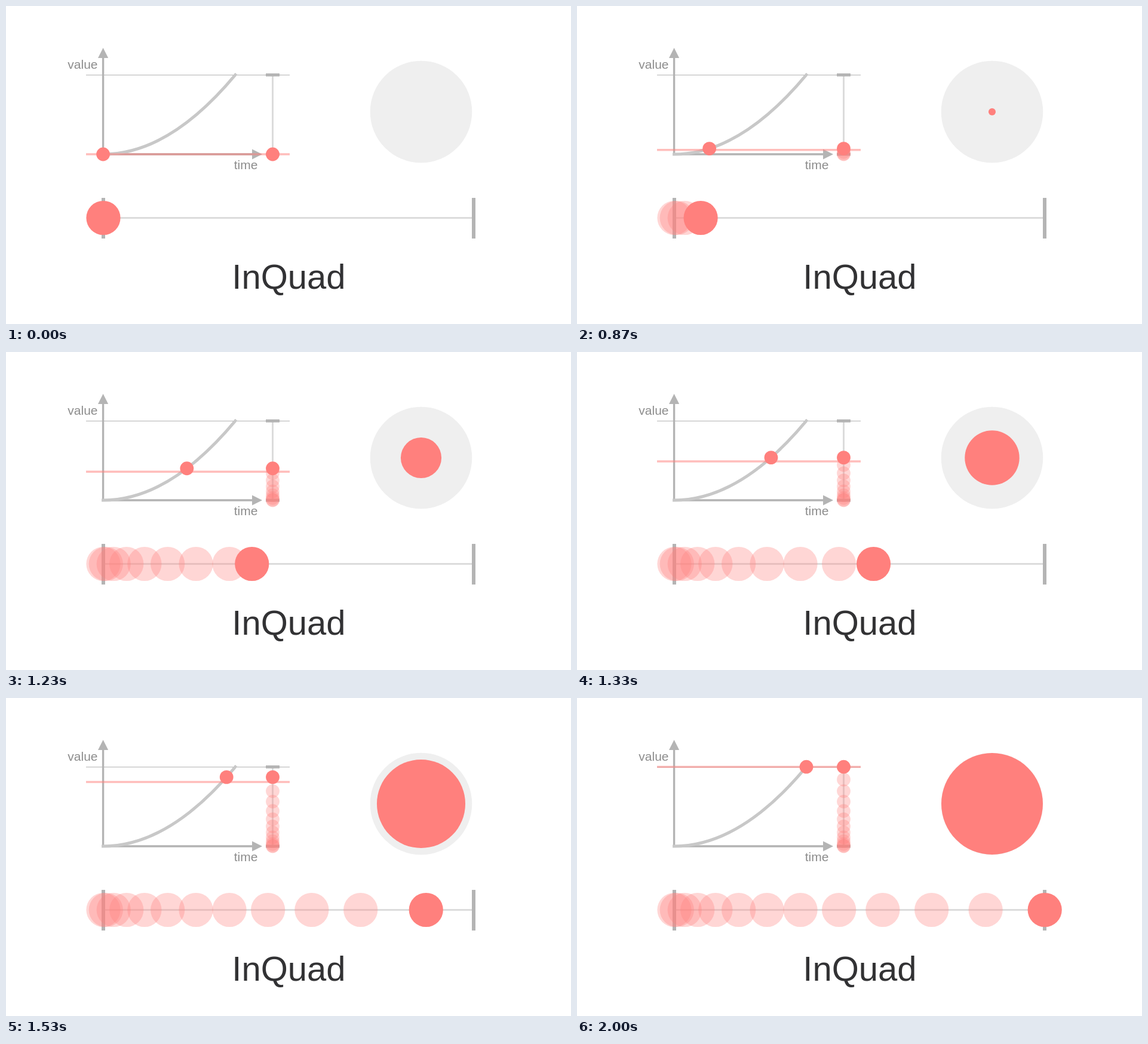
Write an HTML page that moves like this. It is 946x532 px and loops after 2.91 s.

```html
<!DOCTYPE html>
<html lang="en">
<head>
<meta charset="utf-8">
<title>InQuad</title>
<style>
  html, body { margin: 0; width: 100%; height: 100%; overflow: hidden; background: #fff; }
  svg { display: block; width: 100%; height: 100%; }
  text { font-family: "Liberation Sans", Arial, sans-serif; }
  .label { font-size: 21px; fill: #8c8c8c; }
  .title { font-size: 58px; fill: #323234; text-anchor: middle; }
  .dark { stroke: #b4b4b4; }
  .light { stroke: #dcdcdc; stroke-width: 3; }
  .head { fill: #b4b4b4; }
  .red { fill: #ff807d; }
  .ghost { fill: #ff807d; fill-opacity: .32; }
</style>
</head>
<body>
<svg viewBox="0 0 946 532" fill="none">
  <path class="dark" d="M134 115.5H475"/>
  <path class="dark" stroke-width="3.4" d="M162.6 248V86M161 248H413"/>
  <path class="head" d="M162.6 70L171.2 87H154ZM429 248L412 256.5V239.5Z"/>
  <path stroke="#c8c8c8" stroke-width="5" stroke-linecap="square" d="M162.6 248Q273.3 248 384 115.2"/>
  <path id="level" stroke="#ff807d" stroke-opacity=".52" stroke-width="3.4" d="M134 0H475"/>
  <text class="label" x="103.3" y="105">value</text>
  <text class="label" x="381.7" y="273">time</text>

  <path class="light" d="M446.5 115V248"/>
  <path class="dark" stroke-width="5" d="M435 115.3H458M435 248H458"/>

  <path class="light" d="M163 354.5H783"/>
  <path class="dark" stroke-width="6" d="M163 321V389M783 321V389"/>

  <g id="ghosts"></g>
  <circle id="plotDot" class="red" r="11.4"/>
  <circle id="poleDot" class="red" r="11.4" cx="446.5"/>
  <circle id="trackDot" class="red" r="28.6" cy="354.5"/>

  <circle cx="695" cy="177" r="85.3" fill="#efefef"/>
  <circle id="disc" class="red" cx="695" cy="177"/>
  <text class="title" x="473.4" y="473">InQuad</text>
</svg>
<script>
  const LOOP = 2910, FPS = 30, START = 18, STEPS = 30, GHOSTS = 12;
  const el = id => document.getElementById(id);
  const set = (node, attrs) => {
    for (const name in attrs) node.setAttribute(name, attrs[name]);
  };

  const ease = p => p * p;
  const plotX = p => 162.6 + 221.4 * p;
  const valueY = p => 248 - 132.8 * ease(p);
  const trackX = p => 163 + 620.2 * ease(p);
  const progress = step => Math.min(Math.max(step / STEPS, 0), 1);

  const ghosts = Array.from({ length: GHOSTS }, (_, i) => {
    const at = i / GHOSTS;
    const group = document.createElementNS("http://www.w3.org/2000/svg", "g");
    for (const [cx, cy, r] of [[446.5, valueY(at), 11.4], [trackX(at), 354.5, 28.6]]) {
      const circle = document.createElementNS("http://www.w3.org/2000/svg", "circle");
      set(circle, { class: "ghost", cx, cy, r });
      group.append(circle);
    }
    el("ghosts").append(group);
    return { at, group };
  });

  function draw(ms) {
    // Frame starts are rounded to 10 ms, hence the small offset.
    const step = Math.floor((ms + 4) * FPS / 1000) - START;
    const p = progress(step);
    const late = progress(step - 1); // level line and ghosts trail by one step
    set(el("plotDot"), { cx: plotX(p), cy: valueY(p) });
    set(el("poleDot"), { cy: valueY(p) });
    set(el("trackDot"), { cx: trackX(p) });
    set(el("disc"), { r: 85 * ease(p) });
    set(el("level"), { transform: `translate(0 ${valueY(late)})` });
    for (const { at, group } of ghosts) {
      group.style.display = late > at ? "" : "none";
    }
  }

  const begin = performance.now();
  function tick() {
    draw((performance.now() - begin) % LOOP);
    requestAnimationFrame(tick);
  }
  tick();
</script>
</body>
</html>
```
